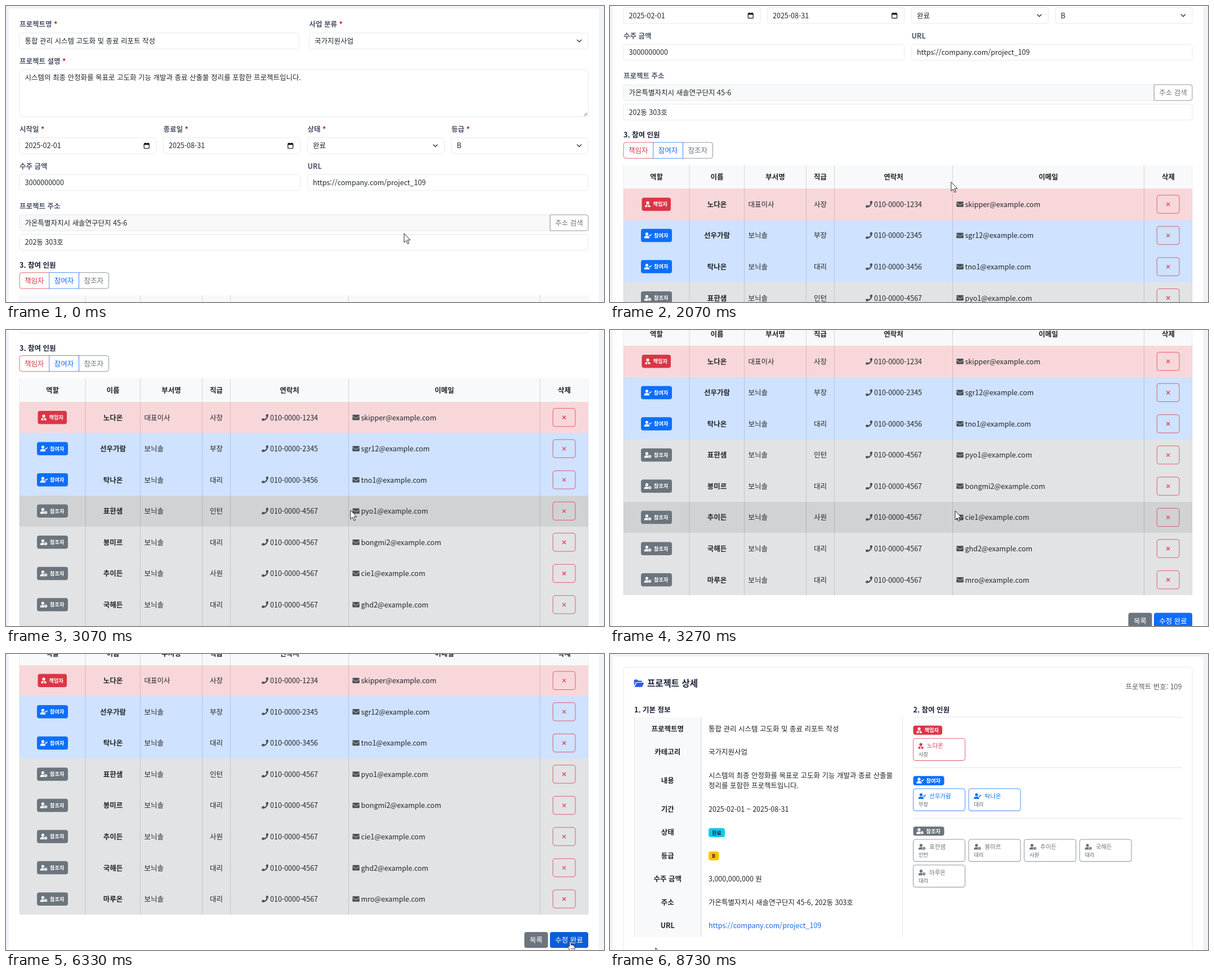
Animation of 1062 by 527 pixels, one loop 8.8 s. Source, as an HTML page:

```html
<!DOCTYPE html>
<html lang="ko">
<head>
<meta charset="utf-8">
<style>
html, body { margin: 0; width: 100%; height: 100%; overflow: hidden; background: #f0f4f9; }
svg { display: block; }
text { font: 12.5px "Noto Sans CJK KR", "Noto Sans KR", sans-serif; fill: #212529; }
.b { font-weight: 700; }
.l { font-weight: 700; fill: #4d546b; }
.h { font-weight: 700; fill: #1a1f36; }
.s { font-size: 9.2px; }
.n { font-size: 10.5px; }
.t { font-size: 15.5px; }
.m { text-anchor: middle; }
.e { text-anchor: end; }
.row { shape-rendering: crispEdges; }
</style>
</head>
<body>
<svg id="stage" width="1062" height="527" viewBox="0 0 1062 527"></svg>
<script>
const RED = '#dc3545', BLUE = '#0d6efd', GRAY = '#6c757d', LINE = '#dee2e6';
const BORDER = .75;
const kinds = [
  { label: '책임자', color: RED, bg: '#f8d7da', hover: '#e5c7ca' },
  { label: '참여자', color: BLUE, bg: '#cfe2ff', hover: '#bfd1ec' },
  { label: '참조자', color: GRAY, bg: '#e2e3e5', hover: '#d1d2d4' }
];
const people = [
  [0, '노다온', '대표이사', '사장', '010-0000-1234', 'skipper@example.com'],
  [1, '선우가람', '보늬솔', '부장', '010-0000-2345', 'sgr12@example.com'],
  [1, '탁나온', '보늬솔', '대리', '010-0000-3456', 'tno1@example.com'],
  [2, '표한샘', '보늬솔', '인턴', '010-0000-4567', 'pyo1@example.com'],
  [2, '봉미르', '보늬솔', '대리', '010-0000-4567', 'bongmi2@example.com'],
  [2, '추이든', '보늬솔', '사원', '010-0000-4567', 'cie1@example.com'],
  [2, '국해든', '보늬솔', '대리', '010-0000-4567', 'ghd2@example.com'],
  [2, '마루온', '보늬솔', '대리', '010-0000-4567', 'mro@example.com']
];
const address = '가온특별자치시 새솔연구단지 45-6', unit = '202동 303호';
const url = 'https://company.com/project_109';
const ROW0 = 557, ROW_H = 55.55, MAX_SCROLL = 537.5;
const fields = [];

// y is always the vertical centre of the text
const text = (x, y, s, cls = '', fill = '') =>
  `<text x="${x}" y="${y}" dy=".37em" class="${cls}" ${fill && `style="fill:${fill}"`}>${s}</text>`;
const box = (x, y, w, h, fill, stroke = 'none', r = 4, extra = '') =>
  `<rect x="${x}" y="${y}" width="${w}" height="${h}" rx="${r}" fill="${fill}" stroke="${stroke}" stroke-width="${BORDER}" ${extra}/>`;
const stroke = (d, color, w = 1) => `<path d="${d}" fill="none" stroke="${color}" stroke-width="${w}"/>`;
const label = (x, y, s, required = true) =>
  `<text x="${x}" y="${y}" dy=".37em" class="l">${s}${required ? ' <tspan style="fill:#c8141e">*</tspan>' : ''}</text>`;

function field(x, y, w, s, { h = 28.3, fill = '#fff', typed = true } = {}) {
  if (typed) fields.push([x, y, w, h]);
  return box(x, y, w, h, fill, LINE) + text(x + 9.5, y + 14.3, s);
}
const select = (x, y, w, s) => field(x, y, w, s, { typed: false }) +
  stroke(`M${x + w - 20} ${y + 12}l4 4 4-4`, '#343a40', 1.5);
const dateField = (x, y, w, s) => field(x, y, w, s) +
  `<g transform="translate(${x + w - 22.3} ${y + 9})">` + box(.5, 1.3, 9, 8.7, 'none', '#111', 1, 'style="stroke-width:1.2"') +
  '<path d="M.5 1h9v2.8h-9zM2-.3h1.3V2H2zM6.8-.3h1.3V2H6.8z" fill="#111"/></g>';
const rightPart = (x, y, w, h, color) =>
  `<path d="M${x} ${y}h${w - 4}a4 4 0 0 1 4 4v${h - 8}a4 4 0 0 1-4 4H${x}z" fill="#fff" stroke="${color}" stroke-width="${BORDER}"/>`;

function user(x, y, kind, color, bg) {
  const body = '<circle cy="-2.6" r="2.6"/><path d="M-4.7 5V4.3A3.6 3.6 0 0 1-1 .8H1A3.6 3.6 0 0 1 4.7 4.3V5z"/>';
  const mark = [
    `<path d="M-1 .8H1L.5 2 1.1 4.2 0 5-1.1 4.2-.5 2z" fill="${bg}"/>`,
    stroke('M2.4-.8l1.5 1.5 2.9-3', color, 1.3),
    `<circle cx="3.6" cy="2.6" r="3" stroke="${bg}" stroke-width=".8"/>` + stroke('M3.6 1V2.8H4.9', bg, .7)
  ][kind];
  return `<g transform="translate(${x} ${y})" fill="${color}">${kind ? `<g transform="translate(-1.6 0)">${body}</g>` : body}${mark}</g>`;
}
function badge(x, y, kind, h) {
  const { label, color } = kinds[kind], w = kind ? 55 : 51.5;
  return box(x, y - h / 2, w, h, color) + user(x + (kind ? 12 : 10.5), y, kind, '#fff', color) +
    text(x + (kind ? 23 : 20), y, label, 'b s', '#fff');
}

function row([kind, name, dept, rank, phone, mail], i) {
  const top = ROW0 + i * ROW_H, y = top + ROW_H / 2, bg = kinds[kind].bg;
  return `<rect class="row" x="24" y="${top}" width="1010" height="${ROW_H}" fill="${bg}"/>` +
    badge(kind ? 55 : 56.5, y, kind, 23.5) + text(190, y + .3, name, 'b m') +
    text(245.5, y + .3, dept) + text(373.5, y + .3, rank, 'm') +
    `<path transform="translate(454 ${y - 6})" fill="#495057" d="M11.6.6 9.1 0 8.5.4 7.4 3l.2.7L9 4.8A8.5 8.5 0 0 1 4.8 9L3.7 7.6 3 7.4.3 8.6 0 9.2.6 11.6 1.1 12A11 11 0 0 0 12 1.1z"/>` +
    text(469, y + .3, phone) + box(615.3, y - 4.8, 12.5, 9.6, '#495057', 'none', 1.2) +
    stroke(`M615.3 ${y - 2.4}l6.2 4.2 6.3-4.2`, bg, .9) + text(630.5, y + .3, mail) +
    box(971.3, y - 16.2, 39.7, 32.4, 'none', RED) + stroke(`M988.2 ${y - 2.9}l6 6m0-6l-6 6`, RED, 1.2);
}

function formPage() {
  const lines = [141, 238.5, 348.5, 398.5, 608.5, 948.5].map(x => `M${x} 515V1001.4`).join('');
  const heads = ['역할', '이름', '부서명', '직급', '연락처', '이메일', '삭제'];
  return box(5, 4.5, 1048, 1090, '#fff') +
    label(24, 32.5, '프로젝트명') + field(24, 48, 496, '통합 관리 시스템 고도화 및 종료 리포트 작성') +
    label(538.5, 32.5, '사업 분류') + select(538.5, 48, 495.5, '국가지원사업') +
    label(24, 98, '프로젝트 설명') +
    field(24, 113.5, 1010, '시스템의 최종 안정화를 목표로 고도화 기능 개발과 종료 산출물 정리를 포함한 프로젝트입니다.', { h: 83.5 }) +
    stroke('M1026.5 195.5l5.5-5.5m-2.5 5.5l2.5-2.5', '#555', .9) +
    label(24, 219, '시작일') + dateField(24, 234.5, 243, '2025-02-01') +
    label(279.5, 219, '종료일') + dateField(279.5, 234.5, 243, '2025-08-31') +
    label(535.5, 219, '상태') + select(535.5, 234.5, 243, '완료') +
    label(791, 219, '등급') + select(791, 234.5, 243, 'B') +
    label(24, 285, '수주 금액', false) + field(24, 300, 498.5, '3000000000') +
    label(535.5, 285, 'URL', false) + field(535.5, 300, 498.5, url) +
    label(24, 356.3, '프로젝트 주소', false) + field(24, 371.8, 942, address, { fill: '#f8f9fb' }) +
    rightPart(966.3, 371.8, 67.7, 28.3, GRAY) + text(1000, 386, '주소 검색', 'm', GRAY) +
    field(24, 406.5, 1010, unit) +
    text(24, 461, '3. 참여 인원', 'h') +
    rightPart(129.5, 474.7, 53, 28.3, GRAY) +
    stroke('M77 474.7H28a4 4 0 0 0-4 4v20.3a4 4 0 0 0 4 4h49', RED, BORDER) + box(76.8, 474.7, 52.7, 28.3, '#fff', BLUE, 0) +
    kinds.map((k, i) => text(50.3 + i * 52.7, 489, k.label, 'm', k.color)).join('') +
    box(24, 515.3, 1010, 42, '#f8f9fa', 'none', 0) +
    people.map(row).join('') +
    stroke(lines, 'rgba(0,0,0,.14)') + stroke('M24 515V1001.4M1034 515V1001.4', 'rgba(0,0,0,.08)', .9) +
    [82.5, 190, 293.5, 373.5, 503.5, 778.5, 991.5].map((x, i) => text(x, 536.5, heads[i], 'b m')).join('') +
    box(920.5, 1032.5, 42, 28.3, GRAY) + text(941.5, 1047, '목록', 'm', '#fff') +
    box(966, 1032.5, 68, 28.3, BLUE, 'none', 4, 'id="save"') + text(1000, 1047, '수정 완료', 'm', '#fff');
}

function personCard([kind, name, , rank], x, y) {
  const { color } = kinds[kind];
  return box(x + .3, y + 1.3, 92, 39.3, 'rgba(0,0,0,.07)') + box(x, y, 92, 39.3, '#fff', color) +
    user(x + (kind ? 15.5 : 13.5), y + 13.3, kind, color, '#fff') +
    text(x + (kind ? 28.5 : 24.5), y + 13.2, name, 'n', color) + text(x + 9.5, y + 27.8, rank, 's', '#5c636a');
}

function detailPage() {
  const info = [
    [133, '프로젝트명', '통합 관리 시스템 고도화 및 종료 리포트 작성'], [174.5, '카테고리', '국가지원사업'],
    [225.5, '내용', ''], [276, '기간', '2025-02-01 ~ 2025-08-31'], [317.7, '상태', ''], [359.2, '등급', ''],
    [400.5, '수주 금액', '3,000,000,000 원'], [442, '주소', `${address}, ${unit}`], [483.5, 'URL', '']
  ];
  const groups = [[0, 135.7, 150.3], [1, 225.5, 239.8], [2, 315.4, 330]];
  return box(5, 4.5, 1048, 560, '#fff') + box(24, 23.5, 1010, 540, '#fff', LINE, 5) +
    '<path d="M42.7 57V47q0-1.6 1.6-1.6h4l2 2h5.2q1.5 0 1.5 1.5v1.2H47.2q-1.1 0-1.6 1z" fill="#2f5be8"/>' +
    '<path d="M43.6 58.8l3.3-7q.4-.7 1.2-.7h11.2q1.2 0 .8 1l-2.8 6q-.4.7-1.2.7z" fill="#2f5be8"/>' +
    text(66, 52, '프로젝트 상세', 'h t') + text(1015.5, 58, '프로젝트 번호: 109', 'e', '#565c63') +
    text(43, 99, '1. 기본 정보', 'h') + text(538.5, 99, '2. 참여 인원', 'h') +
    box(43, 112, 119, 391.7, '#f8f9fa', 'none', 0) +
    stroke('M43 112V503.7M519.5 112V503.7M538.5 112.3H1016M538.5 202.3H1016M538.5 292.3H1016', '#e0e3e7') +
    stroke('M162 112V503.7', '#d3d7db') +
    info.map(([y, k, v]) => text(102.3, y, k, 'b m') + text(175, y, v)).join('') +
    text(175, 216, '시스템의 최종 안정화를 목표로 고도화 기능 개발과 종료 산출물') +
    text(175, 234.8, '정리를 포함한 프로젝트입니다.') +
    box(175, 310, 29, 16, '#0dcaf0') + text(189.5, 318.2, '완료', 'b s m') +
    box(175, 351.5, 18.5, 16, '#ffc107') + text(184.2, 359.7, 'B', 'b s m') +
    text(175, 483.5, url, '', '#1668e8') +
    groups.map(([kind, y, cardY]) => badge(538.5, y, kind, 16.3) +
      people.filter(p => p[0] === kind).map((p, i) =>
        personCard(p, 538.5 + i % 4 * 98.5, cardY + (i >> 2) * 45.7)).join('')).join('');
}

const cursors = {
  arrow: '<path d="M0 0V16L3.7 12.6 6.2 18.5 8.6 17.5 6.1 11.7H11z" fill="#fff" stroke="#111" stroke-width=".9"/>',
  beam: stroke('M-3-8H-1.2Q0-8 0-7V8Q0 9-1.2 9H-3M3-8H1.2Q0-8 0-7M3 9H1.2Q0 9 0 8', '#000', 1.7),
  hand: '<path d="M-1.3 9V1.3Q-1.3 0 0 0T1.3 1.3V6Q3.5 5.2 4 6.5 6.2 6 6.5 7.5 8 7.3 8 9V11.5Q8 14 6.7 16.5H-.4Q-2 13-4 10.2-4.3 8-2.6 8.4z" fill="#fff" stroke="#111" stroke-width=".9"/>' +
    stroke('M1.6 11v3M3.6 11v3M5.6 11v3', '#111', .6)
};

stage.innerHTML = `<g id="form">${formPage()}</g><g id="detail">${detailPage()}</g><g id="pointer"></g>`;
const [form, detail, pointer, save] = ['form', 'detail', 'pointer', 'save'].map(id => document.getElementById(id));
const rows = [...document.querySelectorAll('.row')];

const LOOP = 8800, STEP = 1000 / 15, SWAP = 6600;
const path = [
  [0, 707, 405], [70, 708, 403], [200, 715, 382], [360, 706, 335], [530, 690, 305], [670, 690, 305],
  [1000, 640, 304], [1400, 605, 305], [2200, 606, 315], [2400, 607, 316], [2600, 607.5, 316],
  [2930, 611, 320], [3260, 613, 322], [3410, 613, 322], [3800, 730, 352], [4100, 875, 398],
  [4330, 956, 446], [4400, 976, 470], [4520, 1004, 502], [4900, 1012, 508], [5200, 1006, 485],
  [5420, 964, 455], [5560, 966, 460], [5800, 1004, 509], [5950, 1004, 509], [6130, 1002, 512],
  [6340, 1002, 512], [6700, 930, 460], [7130, 792, 379], [7540, 792, 379], [7800, 470, 440],
  [8130, 54, 529], [8690, 81, 529], [8725, 81, 523], [8800, 81, 523]
];
const notches = [1000, 1430, 1870, 2430, 2600, 3010, 3156];

const clamp = u => Math.max(0, Math.min(1, u));
function position(t) {
  const i = Math.max(1, path.findIndex(p => p[0] >= t)), [a, b] = [path[i - 1], path[i]];
  const u = clamp((t - a[0]) / (b[0] - a[0]));
  return [a[1] + (b[1] - a[1]) * u, a[2] + (b[2] - a[2]) * u];
}
const scrollAt = t => Math.min(MAX_SCROLL,
  notches.reduce((sum, start) => sum + 79 * (1 - (1 - clamp((t - start) / 330)) ** 3), 0));
const inside = (x, y, [bx, by, w, h]) => x >= bx && x <= bx + w && y >= by && y <= by + h;
function onSave(t) {
  const [x, y] = position(t);
  return inside(x, y + scrollAt(t), [966, 1032.5, 68, 28.3]);
}

function draw(t) {
  const [x, y] = position(t), scroll = scrollAt(t), docY = y + scroll, onForm = t < SWAP - 1;
  form.style.display = onForm ? '' : 'none';
  detail.style.display = onForm ? 'none' : '';
  form.setAttribute('transform', `translate(0 ${-scroll})`);
  const over = x > 24 && x < 1034 ? Math.floor((docY - ROW0) / ROW_H) : -1;
  rows.forEach((r, i) => r.setAttribute('fill', kinds[people[i][0]][i === over ? 'hover' : 'bg']));
  // 150 ms colour transition of the hovered button
  let shade = 0;
  for (let k = 0; k < 10; k++) shade += onSave(t - k * 15) / 10;
  save.setAttribute('fill', `rgb(${13 - 2 * shade},${110 - 16 * shade},${253 - 38 * shade})`);
  const shape = !onForm ? 'arrow' : onSave(t) ? 'hand' : fields.some(f => inside(x, docY, f)) ? 'beam' : 'arrow';
  if (pointer.dataset.shape !== shape) {
    pointer.dataset.shape = shape;
    pointer.innerHTML = cursors[shape];
  }
  pointer.setAttribute('transform', `translate(${x} ${y})`);
}

const began = performance.now();
function tick() {
  const t = (performance.now() - began) % LOOP;
  draw(Math.floor((t + 4) / STEP) * STEP % LOOP);
  requestAnimationFrame(tick);
}
tick();
</script>
</body>
</html>
```
